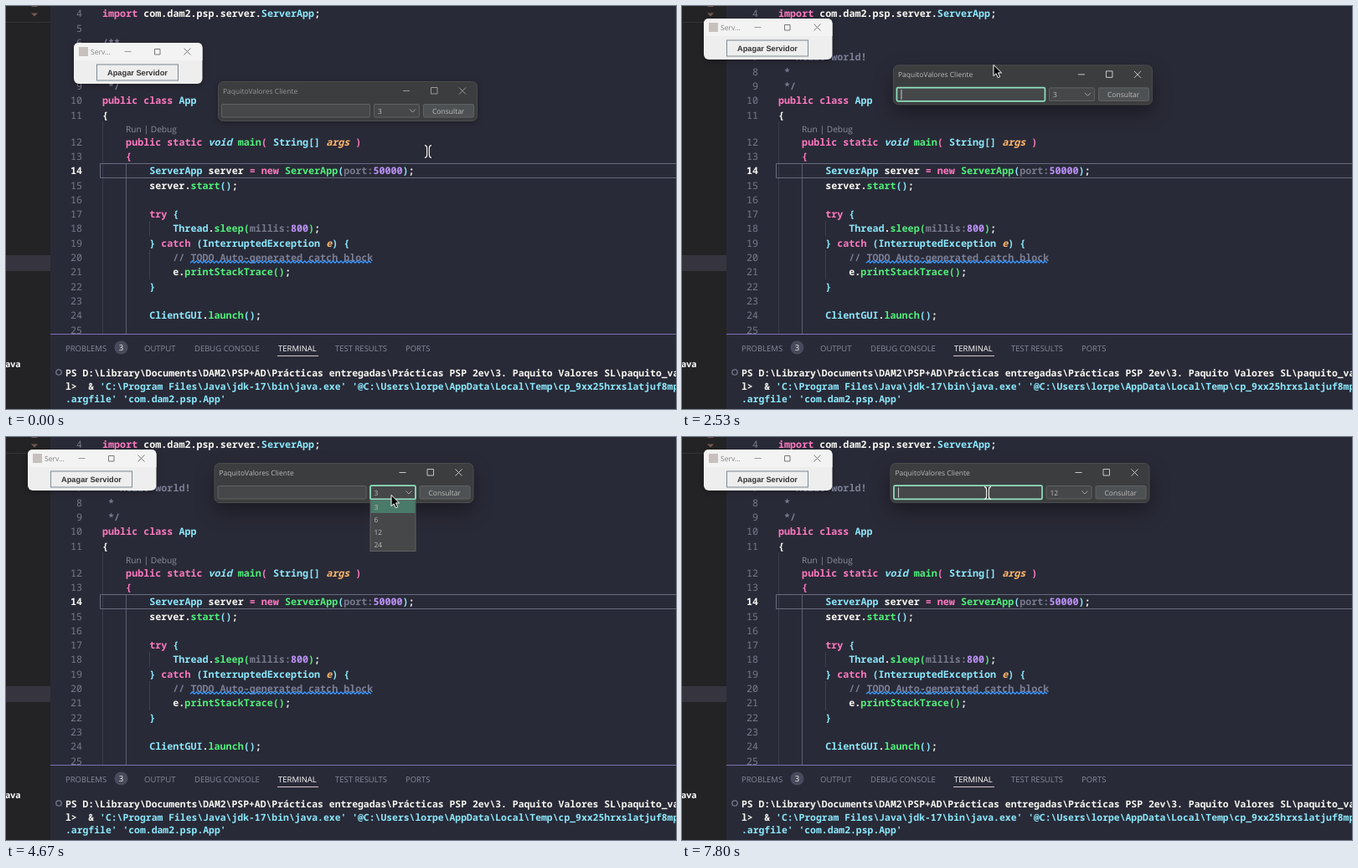
Write an HTML page that moves like this. It is 800 px wide and 482 px high and loops after 8000 ms.

```html
<!DOCTYPE html>
<html lang="es">
<head>
<meta charset="utf-8">
<title>Editor</title>
<style>
  html, body { margin: 0; width: 100%; height: 100%; overflow: hidden; background: #292a37; }
  svg { display: block; width: 800px; height: 482px; }
  text { white-space: pre; text-rendering: geometricPrecision; }
  .code, .term { font-family: "Noto Sans Mono", "DejaVu Sans Mono", monospace; font-weight: 600; }
  .code { font-size: 11.72px; }
  .term { font-size: 11.42px; }
  .num { font-weight: 500; }
  .ui { font-family: "Open Sans", "Noto Sans", sans-serif; }
  .swing { font: bold 9.26px "Liberation Sans", Arial, sans-serif; }
</style>
</head>
<body>
<svg id="stage" viewBox="0 0 800 482" xmlns="http://www.w3.org/2000/svg"></svg>
<script>
const NS = "http://www.w3.org/2000/svg";
const stage = document.getElementById("stage");
const LOOP = 8000, STEP = 200 / 3;

function add(parent, tag, attrs, content) {
  const el = document.createElementNS(NS, tag);
  for (const key in attrs) el.setAttribute(key, attrs[key]);
  if (content !== undefined) el.textContent = content;
  parent.appendChild(el);
  return el;
}
const rect = (p, x, y, width, height, fill, more) =>
  add(p, "rect", { x, y, width, height, fill, ...more });
const line = (p, d, stroke, width = 1, more) =>
  add(p, "path", { d, stroke, "stroke-width": width, fill: "none", ...more });
const label = (p, x, y, str, fill, size, cls = "ui") =>
  add(p, "text", { x, y, fill, class: cls, ...(size && { "font-size": size }) }, str);
const show = (el, on) => el.setAttribute("visibility", on ? "inherit" : "hidden");
const place = (el, [x, y]) => el.setAttribute("transform", `translate(${x} ${y})`);

// ---- editor ----
const INK = {
  w: "#f8f8f2", p: "#ff79c0", c: "#8be9fd", i: "#8be9fd", g: "#50f07b",
  o: "#ffb86c", h: "#777a8c", m: "#7b7f96", n: "#bd93f9"
};

// "~x" switches to the ink with key x
function rich(cls, x, y, src) {
  const el = add(stage, "text", { x, y, class: cls });
  const parts = src.split(/~(.)/);
  for (let k = 1; k < parts.length; k += 2) {
    const span = add(el, "tspan", { fill: INK[parts[k]] }, parts[k + 1]);
    if ("io".includes(parts[k])) span.setAttribute("font-style", "italic");
  }
}

const CODE = {
  4: [0, "~pimport~w com.dam2.psp.server.~cServerApp~w;"],
  6: [0, "~m/**"],
  7: [0, "~m * Hello world!"],
  8: [0, "~m *"],
  9: [0, "~m */"],
  10: [0, "~ppublic class ~cApp"],
  11: [0, "~w{"],
  12: [1, "~ppublic static ~ivoid ~gmain~p( ~cString[] ~oargs ~p)"],
  13: [1, "~p{"],
  14: [2, "~cServerApp ~wserver ~p= new ~gServerApp~c(~hport:~n50000~c)~w;"],
  15: [2, "~wserver.~gstart~c()~w;"],
  17: [2, "~ptry ~c{"],
  18: [3, "~cThread~w.~gsleep(~hmillis:~n800~g)~w;"],
  19: [2, "~c} ~pcatch ~c(InterruptedException ~oe~c) {"],
  20: [3, "~m// TODO Auto-generated catch block"],
  21: [3, "~we.~gprintStackTrace()~w;"],
  22: [2, "~c}"],
  24: [2, "~cClientGUI~w.~glaunch~c()~w;"]
};
const rowY = n => (n < 12 ? 113 + (n - 10) * 17.3 : 197 + (n - 14) * 17.3) + 4.2;

function drawEditor() {
  rect(stage, 0, 0, 800, 482, "#292a37");
  rect(stage, 0, 0, 53, 482, "#232325");
  rect(stage, 0, 19, 53, 1, "#343338");
  rect(stage, 0, 298, 53, 19, "#36353f");
  line(stage, "M30 1h8l-4 -4zM30 8.5h8l-4 4z", "none", 0, { fill: "#75584f" });
  label(stage, -1, 432, "ava", "#fff", 10.5).setAttribute("font-weight", 700);

  line(stage, "M115.5 138V392", "#3b3c4b");
  line(stage, "M143.5 188V392", "#5c5e70");
  line(stage, "M171.5 257V275M171.5 292V327", "#3f4150");
  line(stage, "M800 188.5H112.5V205.5H800", "#686b7f");

  for (let n = 4; n <= 25; n++) {
    const cls = n === 14 ? "code" : "code num";
    const num = label(stage, 91, rowY(n), n, n === 14 ? "#f8f8f2" : "#777a8c", 0, cls);
    num.setAttribute("text-anchor", "end");
    if (CODE[n]) rich("code", 115 + CODE[n][0] * 28.1, rowY(n), CODE[n][1]);
  }
  label(stage, 143, 150.5, "Run | Debug", "#8c8f9e", 10.2);

  line(stage, "M220 307.3" + "l2.4 -2.4l2.4 2.4".repeat(45), "#3794ff", 1.4);
}

// ---- panel ----
function drawPanel() {
  rect(stage, 53, 392, 747, 90, "#292a37");
  rect(stage, 53, 392, 747, 1, "#7c70b4");
  const tabs = [["PROBLEMS", 71], ["OUTPUT", 165], ["DEBUG CONSOLE", 225],
                ["TERMINAL", 325], ["TEST RESULTS", 393], ["PORTS", 477]];
  for (const [name, x] of tabs)
    label(stage, x, 412.5, name, name === "TERMINAL" ? "#fff" : "#888b9c", 9.5);
  rect(stage, 324, 418, 49, 1, "#d8c2cc");
  add(stage, "circle", { cx: 137.5, cy: 408.5, r: 8, fill: "#484b5b" });
  label(stage, 134.8, 412, "3", "#f8f8f2", 9.5);
  add(stage, "circle", { cx: 63, cy: 438, r: 3.2, fill: "none", stroke: "#777a8c", "stroke-width": 1.3 });
  rich("term", 71, 443,
    "~wPS D:\\Library\\Documents\\DAM2\\PSP+AD\\Prácticas entregadas\\Prácticas PSP 2ev\\3. Paquito Valores SL\\paquito_valore");
  rich("term", 71, 458.5,
    "~wl>  & ~c'C:\\Program Files\\Java\\jdk-17\\bin\\java.exe' '@C:\\Users\\lorpe\\AppData\\Local\\Temp\\cp_9xx25hrxslatjuf8mp1f19");
  rich("term", 71, 474, "~c.argfile' 'com.dam2.psp.App'");
}

// ---- windows ----
const SHADOW = {
  true: "drop-shadow(0 10px 11px rgba(0,0,0,.36))",
  false: "drop-shadow(0 2px 3px rgba(0,0,0,.3))"
};

function makeServer() {
  const g = add(stage, "g");
  rect(g, 0, 0, 153.5, 49, "#eeeeee", { rx: 6 });
  const bar = line(g, "M0 21V6Q0 0 6 0H147.5Q153.5 0 153.5 6V21Z", "none", 0);
  const icon = rect(g, 6, 5, 11, 11, "#b5aca6");
  label(g, 20, 14, "Serv...", "#808080", 8.6);
  line(g, "M60.5 10.5h8", "#999");
  const buttons = line(g, "M96.5 7.5h6.5v6.5h-6.5zM131.5 6.5l8 8m0 -8l-8 8", "#666");
  const button = rect(g, 27.5, 26, 97, 19, "#eeeeee");
  label(g, 40, 39.3, "Apagar Servidor", "#333", 0, "swing");
  const focus = rect(g, 39.5, 28.5, 74, 14, "none", { stroke: "#4b4b55" });
  return {
    update(pos, active) {
      place(g, pos);
      g.style.filter = SHADOW[active];
      bar.setAttribute("fill", active ? "#fcfcfc" : "#f3f3f3");
      icon.setAttribute("opacity", active ? 1 : 0.7);
      buttons.setAttribute("stroke", active ? "#222" : "#777");
      button.setAttribute("stroke", active ? "#a3abb0" : "#7d8a94");
      show(focus, active);
    }
  };
}

function makeClient() {
  const g = add(stage, "g");
  const body = add(g, "g");
  rect(body, 0.5, 0.5, 309, 47, "#3b3d3f", { rx: 6, stroke: "#4b4d4f" });
  const title = label(body, 6, 14.7, "PaquitoValores Cliente", "#999", 8.5);
  const buttons = line(body, "M221 11.5h8M254.5 7.5h7.5v7.5h-7.5zM288 7.5l8 8m0 -8l-8 8", "#999");
  const box = (x, w, fill) =>
    rect(body, x + .5, 27.5, w - 1, 15.5, fill, { rx: 1.5, stroke: "#606264" });
  box(4, 178, "#454749");
  box(186, 55, "#454749");
  box(245, 61, "#4e5153");
  const value = label(body, 191, 38.5, "3", "#bbb", 8.5);
  line(body, "M229 33.5l3.5 3.5l3.5 -3.5", "#a4a6a8");
  label(body, 256, 38.5, "Consultar", "#bbb", 8.5);

  const ring = (x, w) => rect(body, x + .5, 27.2, w - 1, 16.2, "none",
    { rx: 1.5, stroke: "#8fe0bf", "stroke-width": 1.7 });
  const fieldRing = ring(4, 178), comboRing = ring(186, 55);
  const caret = rect(body, 9.5, 29.5, 1, 12, "#c8cacc");

  const popup = add(g, "g");
  rect(popup, 186.5, 44.5, 54, 61, "#454749", { stroke: "#606264" });
  const mark = rect(popup, 187, 45, 53, 15, "#4a7a69");
  ["3", "6", "12", "24"].forEach((s, k) => label(popup, 191, 55.8 + k * 15, s, "#bbb", 8.5));

  return {
    update(pos, s) {
      place(g, pos);
      body.style.filter = SHADOW[s.active];
      title.setAttribute("fill", s.active ? "#bbb" : "#96989a");
      buttons.setAttribute("stroke", s.active ? "#c4c6c8" : "#999");
      if (value.textContent !== s.value) value.textContent = s.value;
      show(fieldRing, s.field);
      show(comboRing, s.combo);
      show(caret, s.caret);
      show(popup, s.popup);
      mark.setAttribute("y", 45 + 15 * s.row);
    }
  };
}

// ---- pointer ----
function makePointer() {
  const g = add(stage, "g");
  const arrow = line(g, "M0 0V13.2L3.1 10.4L5.3 15.3L7.7 14.2L5.5 9.5H9.6Z", "#fff", 1, { fill: "#050505" });
  const beam = add(g, "g");
  line(beam, "M0 -6V6", "#111", 2);
  line(beam, "M-4 -7.5Q-1.3 -7 -1.3 -4V4Q-1.3 7 -4 7.5M4 -7.5Q1.3 -7 1.3 -4V4Q1.3 7 4 7.5", "#fff", 1.2);
  return {
    update(pos, isArrow) {
      place(g, pos);
      show(arrow, isArrow);
      show(beam, !isArrow);
    }
  };
}

// ---- motion: [time, x, y] ----
const POINTER = [
  [0, 504, 174], [66, 313, 31], [200, 313, 31], [500, 220, 55], [870, 122, 55], [940, 117, 54],
  [1090, 117, 54], [1300, 88, 40], [1470, 68, 31], [1670, 62, 26], [1890, 62, 26],
  [2270, 373, 90], [2330, 373, 90], [2530, 372, 71], [2735, 369, 33], [2800, 368.5, 31],
  [3000, 240, 62], [3200, 56, 62], [3400, 100, 104], [3600, 123, 74], [3670, 123, 74],
  [3740, 115, 92], [3870, 220, 108], [4000, 350, 80], [4066, 385, 41], [4130, 414, 66],
  [4290, 414, 66], [4530, 460, 67], [4700, 460, 70], [5130, 452, 98], [5270, 452, 114],
  [5540, 452, 114], [5800, 497, 74], [5940, 497, 74], [6130, 369, 76], [6270, 369, 76],
  [6400, 365, 74], [6870, 365, 74], [7200, 365, 67]
];
const SERVER = [[1090, 81, 44], [1300, 52, 29.5], [1470, 32, 20], [1670, 26, 15]];
const CLIENT = [[2330, 253, 90], [2530, 252, 71], [2735, 249, 33], [2800, 248.5, 31]];

function at(keys, t) {
  const k = keys.findIndex(key => key[0] > t);
  if (k === 0) return keys[0].slice(1);
  if (k < 0) return keys[keys.length - 1].slice(1);
  const [t0, x0, y0] = keys[k - 1], [t1, x1, y1] = keys[k];
  const f = (t - t0) / (t1 - t0);
  return [x0 + (x1 - x0) * f, y0 + (y1 - y0) * f];
}
const within = ([x, y], [ox, oy], l, t, r, b) =>
  x >= ox + l && x <= ox + r && y >= oy + t && y <= oy + b;

drawEditor();
drawPanel();
const server = makeServer(), client = makeClient(), pointer = makePointer();

function draw(now) {
  const t = Math.floor((now % LOOP + 4) / STEP) * STEP;
  // the first step is a jump, not a glide
  const p = at(POINTER, t), s = at(SERVER, t), c = at(CLIENT, t);

  const active = t >= 2320;
  const field = active && t < 4590 || t >= 6660;
  const popup = t >= 4590 && t < 5525;
  const blink = t - (t >= 6660 ? 6660 : 2330);
  const row = t < 4700 ? 0 : Math.max(0, Math.min(2, Math.floor((p[1] - c[1] - 45) / 15)));

  server.update(s, t >= 860 && !active);
  client.update(c, {
    active, field, popup, row,
    combo: t >= 4590 && t < 6660,
    caret: field && Math.floor(blink / 500) % 2 === 0,
    value: t < 5525 ? "3" : "12"
  });

  const overField = within(p, c, 4, 27, 182, 44);
  const overWindow = within(p, s, 0, 0, 153, 49) || within(p, c, 0, -1, 310, 48);
  const overPopup = popup && within(p, c, 186, 44, 241, 106);
  pointer.update(p, overPopup || overWindow && !overField);
}

const start = performance.now();
function tick() {
  draw(performance.now() - start);
  requestAnimationFrame(tick);
}
tick();
</script>
</body>
</html>
```
